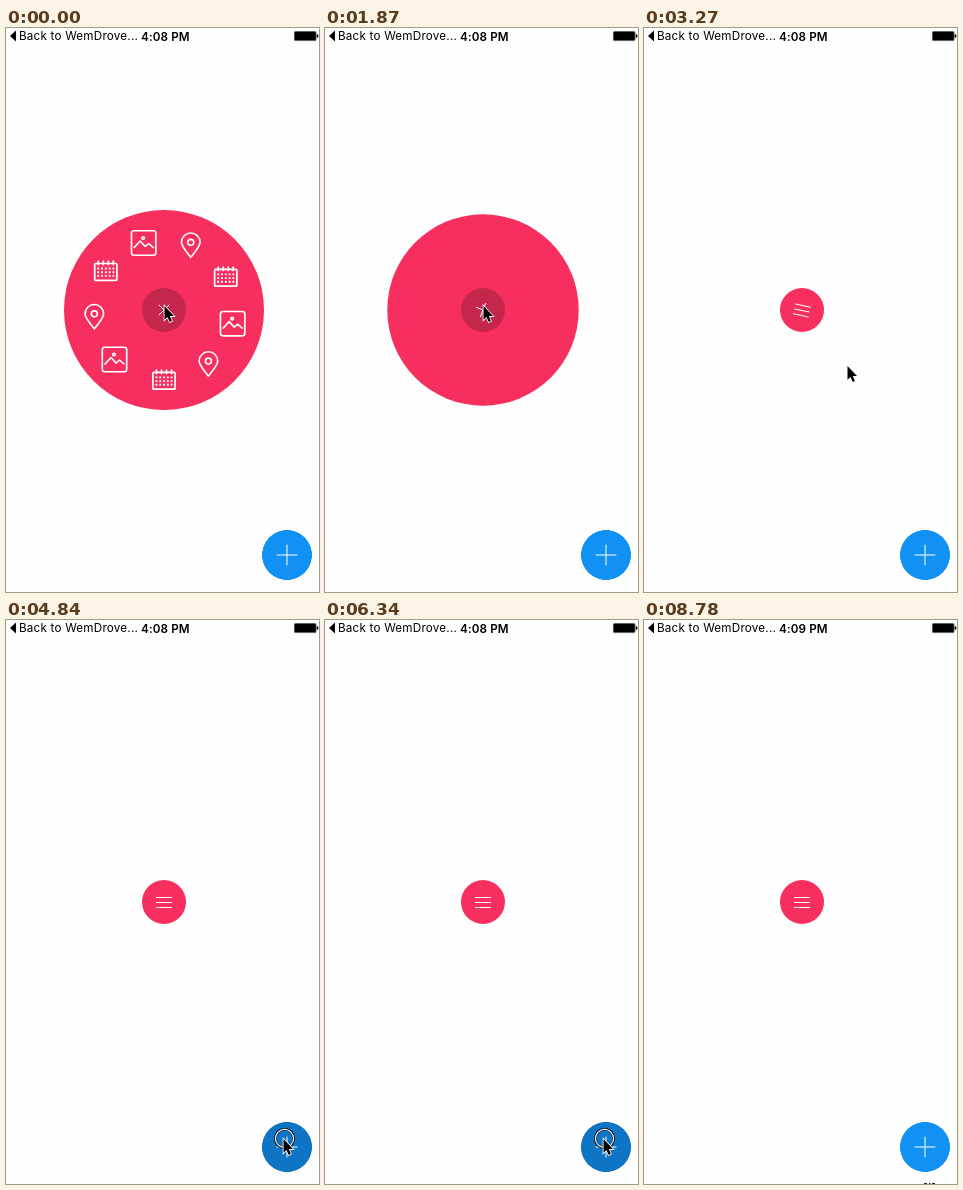
Recreate the animation shown at these times as an HTML page. Size 313 px wide and 564 px high, loop 8810 ms.

```html
<!DOCTYPE html>
<html lang="en">
<head>
<meta charset="utf-8">
<title>Radial menus</title>
<style>
  html, body { margin: 0; width: 100%; height: 100%; overflow: hidden; background: #fefefe; }
  svg { display: block; width: 100vw; height: 100vh; }
  text { font: 11.7px Inter, Roboto, sans-serif; letter-spacing: .2px; white-space: pre; }
  #clock { font-weight: 600; letter-spacing: .1px; }
  .line { fill: none; stroke: #fff; stroke-linecap: round; stroke-linejoin: round; }
</style>
</head>
<body>
<svg viewBox="0 0 313 564">
  <defs>
    <radialGradient id="soft">
      <stop offset=".98" stop-color="#1291f5"/>
      <stop offset="1" stop-color="#1291f5" stop-opacity="0"/>
    </radialGradient>
    <g id="image" class="line" stroke-width="1.6">
      <rect x="-12.2" y="-12.2" width="24.4" height="24.4" rx="2.5"/>
      <path d="M-9.5 4.5L-3.5 -2L1.5 3.5L5 .5L9.5 4.5"/>
      <circle cx="-.5" cy="-5" r="1.3"/>
    </g>
    <g id="pin" class="line" stroke-width="1.6">
      <path d="M0 12C-4 6.5 -9.3 1.5 -9.3 -3A9.3 9.3 0 0 1 9.3 -3C9.3 1.5 4 6.5 0 12Z"/>
      <circle cy="-3" r="3"/>
    </g>
    <g id="calendar">
      <rect class="line" stroke-width="1.7" x="-11.1" y="-7.6" width="22.2" height="16.8" rx="1"/>
      <path class="line" stroke-width="1.7" d="M-7.5 -10v3.5M-2.5 -10v3.5M2.5 -10v3.5M7.5 -10v3.5"/>
      <path class="line" stroke-width="1.9" style="stroke-linecap:butt" stroke-dasharray="1.9 1.9"
        d="M-8.5 -2.6h17M-8.5 1.1h17M-8.5 4.8h17"/>
    </g>
  </defs>

  <path d="M4 8L10 2.5V13.5Z"/>
  <text x="13" y="12.2">Back to WemDrove...</text>
  <text id="clock" x="135" y="12.6"></text>
  <rect x="288.4" y="3.6" width="21.6" height="9" rx="1.2" stroke="#555" stroke-width=".8"/>
  <rect x="310.7" y="6.3" width="1.6" height="3.4" rx=".7"/>

  <g id="scene"></g>
</svg>
<script>
const LOOP = 8810, HOLD = 900, TICK = 87.56;   // the screen refreshes once per tick after the hold
const ICONS = ['calendar', 'pin', 'image'];
const BARS = 'M-7.5 -4.5h15M-7.5 .5h15M-7.5 5.5h15';
const CROSS = 'M-5 -5L5 5M-5 5L5 -5';
const PLUS = 'M-10 0h20M0 -10v20';

// events: [tick, opens]; dark and RINGS: [first tick, end tick)
const MENUS = [
  { x: 158, y: 282, r: 22, fill: '#f62f5e', count: 9, first: 90, gap: 39.375,
    glyphs: [BARS, CROSS], turn: [90, -40], rest: [0, 0],
    events: [[-50, 1], [0, 0], [10.57, 1], [25, 0]], dark: [[-1, 0], [10, 25]] },
  { x: 281, y: 527, r: 25.2, fill: 'url(#soft)', count: 3, first: 270, gap: 45,
    glyphs: [PLUS, PLUS], turn: [45, -45], rest: [0, 45],
    events: [[-50, 0], [45.03, 1], [56, 0], [62.5, 1], [74, 0]], dark: [[44, 56], [62, 74]] }
];
const RINGS = [[0, 1], [10, 11], [22, 26], [44, 46], [56, 57], [62, 63], [73, 75]];
// cursor stops: tick, x, y
const PATH = [[-1, 158, 277], [12, 158, 277], [20, 196, 337], [22, 196, 337], [23, 203, 337],
  [32, 203, 337], [43, 276, 518], [44, 277, 518], [61, 277, 518], [62, 278, 518],
  [64, 278, 518], [72, 211, 521], [75, 211, 521], [83, 143, 449], [84, 200, 526]];

const within = (ranges, k) => ranges.some(([a, b]) => k >= a && k < b);
const smooth = p => p * p * (3 - 2 * p);
const spring = ms => 1 - Math.exp(-ms / 32) * Math.cos(2 * Math.PI * ms / 170);

function drawMenu(m, k) {
  const [start, open] = m.events.filter(e => e[0] <= k).pop();
  const ms = (k - start) * TICK;
  const grown = open ? spring(ms) : 1 - smooth(Math.min(1, ms / 150));
  const radius = m.r + (100 - m.r) * grown;
  const swing = ms < 430 ? m.turn[open] * Math.exp(-ms / (open ? 70 : 87)) : 0;
  const shown = !open && ms < 1 ? 1 : open;
  const angle = shown === open ? m.rest[open] + swing : m.rest[1];

  let out = `<circle cx="${m.x}" cy="${m.y}" r="${radius}" fill="${m.fill}"/>`;
  if (within(m.dark, k)) out += `<circle cx="${m.x}" cy="${m.y}" r="${m.r}" opacity=".2"/>`;
  out += `<path class="line" stroke-width="1" d="${m.glyphs[shown]}"
    transform="translate(${m.x} ${m.y}) rotate(${angle})"/>`;
  if (open && k - start >= 5) {
    for (let i = 0; i < m.count; i++) {
      const a = (m.first - i * m.gap) * Math.PI / 180;
      out += `<use href="#${ICONS[i % 3]}" x="${m.x + 70 * Math.cos(a)}" y="${m.y + 70 * Math.sin(a)}"/>`;
    }
  }
  return out;
}

function drawCursor(k) {
  const i = PATH.findIndex(p => p[0] >= k);
  if (i < 0) return '';
  const [t1, x1, y1] = PATH[i], [t0, x0, y0] = PATH[Math.max(0, i - 1)];
  const p = t1 > t0 ? smooth((k - t0) / (t1 - t0)) : 1;
  const ring = within(RINGS, k)
    ? `<g fill="none"><circle cx="1.5" cy=".5" r="9.3" stroke="#000" stroke-width="2.5"/>
       <circle cx="1.5" cy=".5" r="9.1" stroke="#fff" stroke-width="1.2"/></g>` : '';
  return `<g transform="translate(${x0 + (x1 - x0) * p} ${y0 + (y1 - y0) * p})">${ring}
    <path d="M.5 1V14.8L3.5 11.9L5.7 17L7.9 16L5.8 11.1H10Z"
      stroke="#fff" stroke-width="1.6" paint-order="stroke"/></g>`;
}

const scene = document.getElementById('scene');
const clock = document.getElementById('clock');
const origin = performance.now();
let last;

function frame() {
  const t = (performance.now() - origin) % LOOP;
  const k = t < HOLD ? -1 : Math.floor((t - HOLD + 11) / TICK);
  if (k !== last) {
    last = k;
    clock.textContent = k < 89 ? '4:08 PM' : '4:09 PM';
    const mark = k < 90 ? '' : '<path d="M280 563.5h3M285 563.5h1.5M288 563.5h3" stroke="#222"/>';
    scene.innerHTML = MENUS.map(m => drawMenu(m, k)).join('') + mark + drawCursor(k);
  }
  requestAnimationFrame(frame);
}
frame();
</script>
</body>
</html>
```
